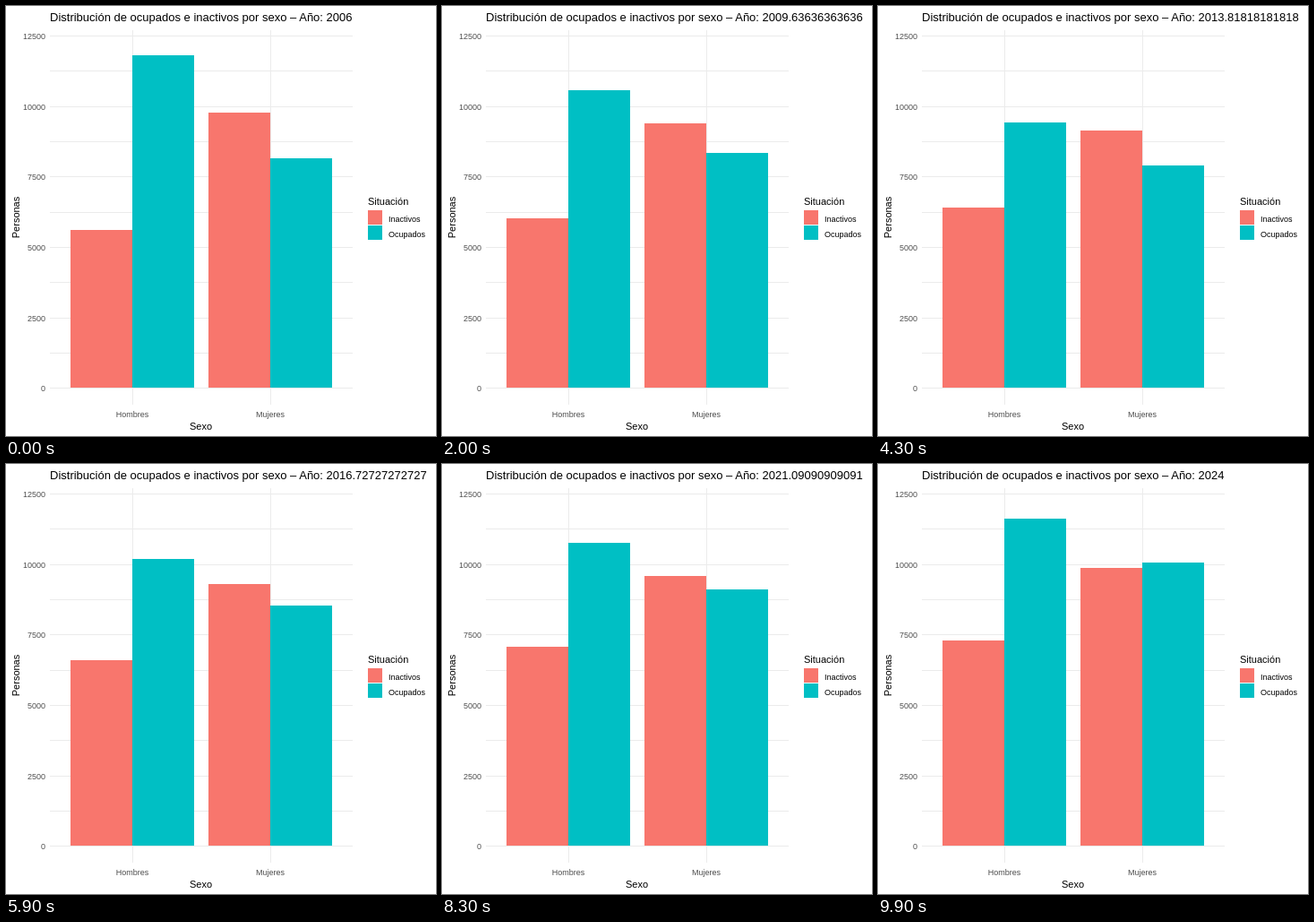
An HTML page for the animation above (10000 ms loop, 480 by 480 pixels).

```html
<!DOCTYPE html>
<html lang="es">
<head>
<meta charset="utf-8">
<title>Ocupados e inactivos por sexo</title>
<style>
  html, body { margin: 0; width: 100%; height: 100%; overflow: hidden; background: #fff; }
  svg { display: block; width: 480px; height: 480px; font: 9px "Liberation Sans", Arial, sans-serif; }
  .title { font-size: 13px; }
  .name { font-size: 11px; }
  .tick { fill: #4d4d4d; }
  .grid { fill: #ebebeb; }
  .inactive { fill: #f8766d; }
  .employed { fill: #00bfc4; }
  .end { text-anchor: end; }
  .mid { text-anchor: middle; }
</style>
</head>
<body>
<svg id="chart" viewBox="0 0 480 480" shape-rendering="crispEdges"></svg>
<script>
const FIRST_YEAR = 2006, SPAN = 18, FRAMES = 100, STEP = 100;
const BASE = 426, ZERO = 426.15, SCALE = 393 / 12500;

// Turning points, in years since the first; values run straight between them
const turns = {
  inactive: [0, 4, 8, 13, 14, SPAN],
  employed: [0, 1, 2, 3, 7, 8, 13, 14, SPAN]
};
const series = [
  { x: 72, cls: "inactive", values: [5600, 6054, 6415, 6750, 7000, 7285] },
  { x: 141, cls: "employed", values: [11809, 12067, 11805, 10800, 9316, 9440, 10790, 10430, 11613] },
  { x: 226, cls: "inactive", values: [9765, 9350, 9130, 9410, 9475, 9865] },
  { x: 295, cls: "employed", values: [8146, 8512, 8664, 8430, 7823, 7895, 9060, 8750, 10060] }
];

const chart = document.getElementById("chart");

function add(tag, attrs, text = "") {
  const el = document.createElementNS("http://www.w3.org/2000/svg", tag);
  for (const key in attrs) el.setAttribute(key, attrs[key]);
  el.textContent = text;
  return chart.appendChild(el);
}
const rect = (cls, x, y, width, height) => add("rect", { class: cls, x, y, width, height });
const label = (cls, x, y, text) => add("text", { class: cls, x, y }, text);
const yOf = value => Math.round(ZERO - value * SCALE);

function valueAt({ cls, values }, time) {
  const times = turns[cls];
  const i = Math.max(1, times.findIndex(t => t >= time));
  const part = (time - times[i - 1]) / (times[i] - times[i - 1]);
  return values[i - 1] + (values[i] - values[i - 1]) * part;
}

for (let v = 0; v <= 12500; v += 1250) {
  rect("grid", 49, yOf(v), 338, 1);
  if (v % 2500 === 0) label("tick end", 44, yOf(v) + 4, v);
}
[["Hombres", 141], ["Mujeres", 295]].forEach(([text, x]) => {
  rect("grid", x, 27, 1, 418);
  label("tick mid", x, 459, text);
});

const bars = series.map(s => rect(s.cls, s.x, BASE, 69, 0));
const title = label("title", 49, 17, "");

label("name mid", 217.5, 473, "Sexo");
label("name mid", 0, 0, "Personas").setAttribute("transform", "translate(15 236) rotate(-90)");

label("name", 404, 222, "Situación");
[["inactive", "Inactivos"], ["employed", "Ocupados"]].forEach(([cls, text], i) => {
  rect(cls, 404, 228 + 17 * i, 16, 16);
  label("", 427, 241 + 17 * i, text);
});

let shown = -1;

function draw(frame) {
  const time = frame * SPAN / (FRAMES - 1);
  const year = Number((FIRST_YEAR + time).toPrecision(15));
  title.textContent = `Distribución de ocupados e inactivos por sexo – Año: ${year}`;
  series.forEach((s, i) => {
    const top = yOf(valueAt(s, time));
    bars[i].setAttribute("y", top);
    bars[i].setAttribute("height", BASE - top);
  });
}

function tick(now) {
  const frame = Math.floor(now / STEP) % FRAMES;
  if (frame !== shown) draw(shown = frame);
  requestAnimationFrame(tick);
}
draw(0);
requestAnimationFrame(tick);
</script>
</body>
</html>
```
